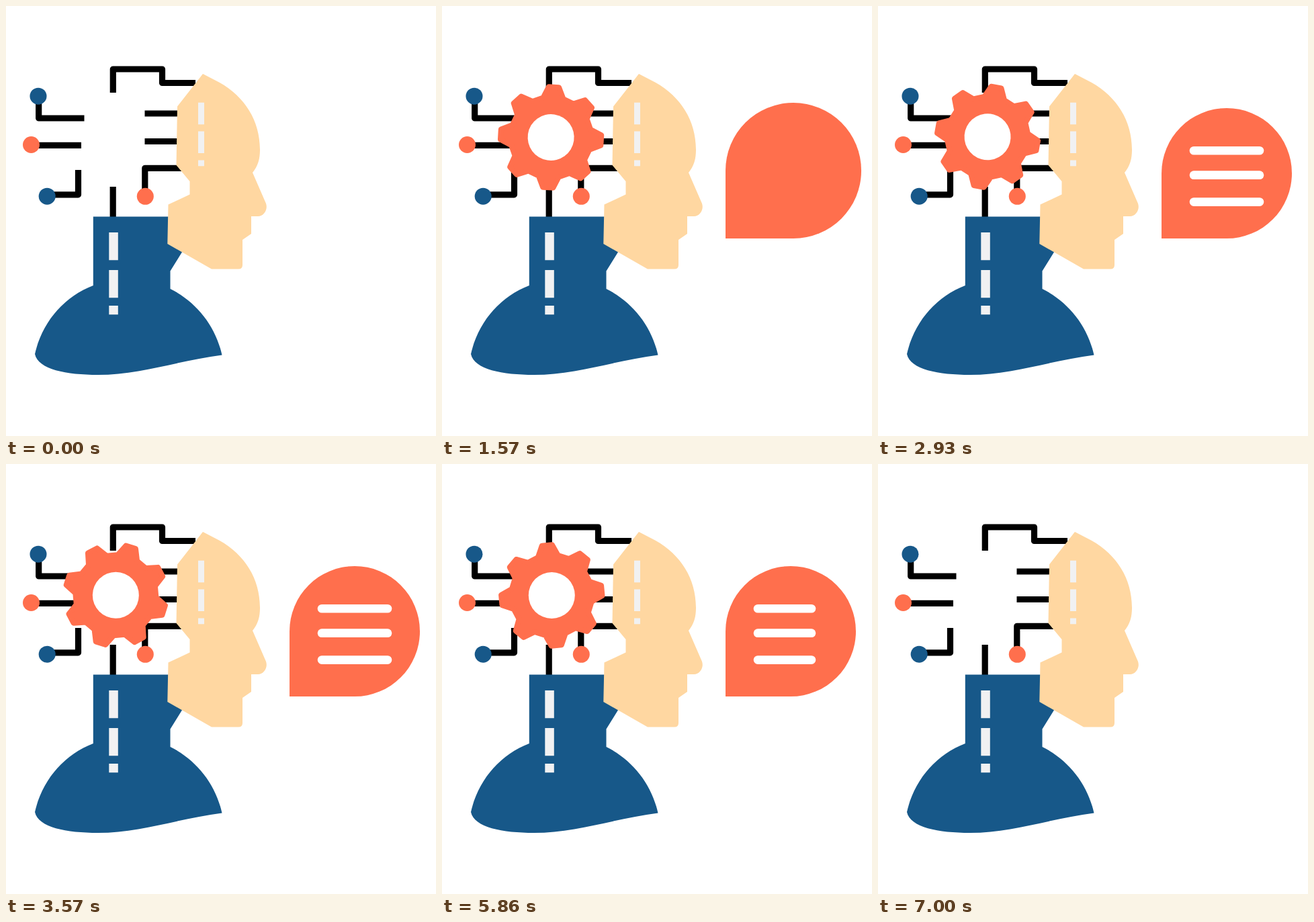
Write an HTML page that moves like this. It is 640 px wide and 640 px high and loops after 7210 ms.

```html
<!DOCTYPE html>
<html lang="en">
<head>
<meta charset="utf-8">
<title>Thinking head</title>
<style>
  html, body { margin: 0; width: 100%; height: 100%; overflow: hidden; background: #fff; }
  svg { display: block; width: 100%; height: 100%; }
  .blue { fill: #175889; }
  .orange { fill: #ff6f4d; }
  .skin { fill: #ffd7a1; }
  .dash { fill: #f1f1f2; }
  .wires { fill: none; stroke: #000; stroke-width: 9.2; stroke-linejoin: round; }
  #teeth { stroke: #ff6f4d; stroke-width: 8; stroke-linejoin: round; }
</style>
</head>
<body>
<svg viewBox="0 0 640 640">
  <path class="wires" d="M159.3 129V94H232.5V114.5H282M48.7 140V167H116.5M45 207.3H112M61 280.8H107.5V244
    M159.2 269V318M206.5 160H258M206.5 201.5H258M206.8 280V241.3H264"/>
  <circle class="blue" cx="48" cy="134.2" r="12.5"/>
  <circle class="orange" cx="37.5" cy="206.5" r="12.5"/>
  <circle class="blue" cx="61.2" cy="283.2" r="12.5"/>
  <circle class="orange" cx="207.3" cy="283.3" r="12.5"/>

  <g id="gear">
    <path id="teeth" class="orange"/>
    <circle r="34.5" fill="#fff"/>
  </g>

  <path class="blue" d="M129.8 313.5H250L262.2 366L244.5 394.5V421C283 440 312 476 321.5 519.5
    C260 527 200 549 137 549C90 549 48 541 43 518C54 470 86 433 129.8 416Z"/>
  <path class="skin" d="M293 101L318 114C355 135 378 170 378 214C378 228 375 238 367 248L387 294
    C390 303 384 313 375 313H365V339L352 348V385.500Q352 391.500 346 391.500H306L240.300 354L241.500 295.500
    L273.500 280.500V261L253.500 237L255 149.500Z"/>
  <path class="dash" d="M286 143.800h9v32.500h-9zM286 186.500h9v32.500h-9zM286 229.500h9v8.700h-9z
    M153.300 337h13.500v41.300h-13.500zM153.300 393h13.500v41.300h-13.500zM153.300 446h13.500v13.300h-13.500z"/>

  <path id="bubble" class="orange" d="M0 0V-97A97 97 0 1 1 97 0Z"/>
  <g id="lines" fill="#fff">
    <rect x="463.700" y="208.900" height="12.700" rx="6.300"/>
    <rect x="463.700" y="245.300" height="12.700" rx="6.300"/>
    <rect x="463.700" y="285.200" height="12.700" rx="6.300"/>
  </g>
</svg>
<script>
const LOOP = 7210, STEP = LOOP / 101;
const byId = id => document.getElementById(id);
const gear = byId('gear'), bubble = byId('bubble');
const lines = byId('lines').children;

// Eight identical teeth, the first one centred at the base angle.
const outline = [];
for (let tooth = 0; tooth < 8; tooth++) {
  for (const [offset, radius] of [[-14.5, 60.1], [-5.8, 75.2], [5.8, 75.2], [14.5, 60.1]]) {
    const a = (tooth * 45 - 5.4 + offset) * Math.PI / 180;
    outline.push((radius * Math.cos(a)).toFixed(2) + ' ' + (radius * Math.sin(a)).toFixed(2));
  }
}
byId('teeth').setAttribute('d', 'M' + outline.join('L') + 'Z');

const progress = (t, start, end) => Math.min(1, Math.max(0, (t - start) / (end - start)));
const easeIn = u => u * u;
const easeOut = u => 1 - (1 - u) ** 2;
const easeInOut = u => (1 - Math.cos(Math.PI * u)) / 2;
const backOut = (u, s = 1.525) => 1 + (s + 1) * (u - 1) ** 3 + s * (u - 1) ** 2;

function draw(t) {
  const gearScale = easeOut(progress(t, 0, 860)) * (1 - easeIn(progress(t, 6118, 6990)));
  const angle = 270 * (easeInOut(progress(t, 440, 4280)) - 1);
  // The gear turns about a point slightly off its own centre.
  gear.setAttribute('transform',
    `translate(162.7 195.3) rotate(${angle}) translate(.6 .2) scale(${gearScale})`);

  const bubbleScale = backOut(progress(t, 866, 2430)) * (1 - easeIn(progress(t, 6208, 6990)));
  bubble.setAttribute('transform', `translate(422 346) scale(${Math.max(0, bubbleScale)})`);

  const lineLength = progress(t, 2430, 2830) - progress(t, 5795, 6155);
  for (const line of lines) line.setAttribute('width', 110.6 * lineLength);
}

function tick() {
  const now = performance.now() % LOOP;
  draw(Math.floor((now + 5) / STEP) % 101 * STEP);
  requestAnimationFrame(tick);
}
tick();
</script>
</body>
</html>
```
